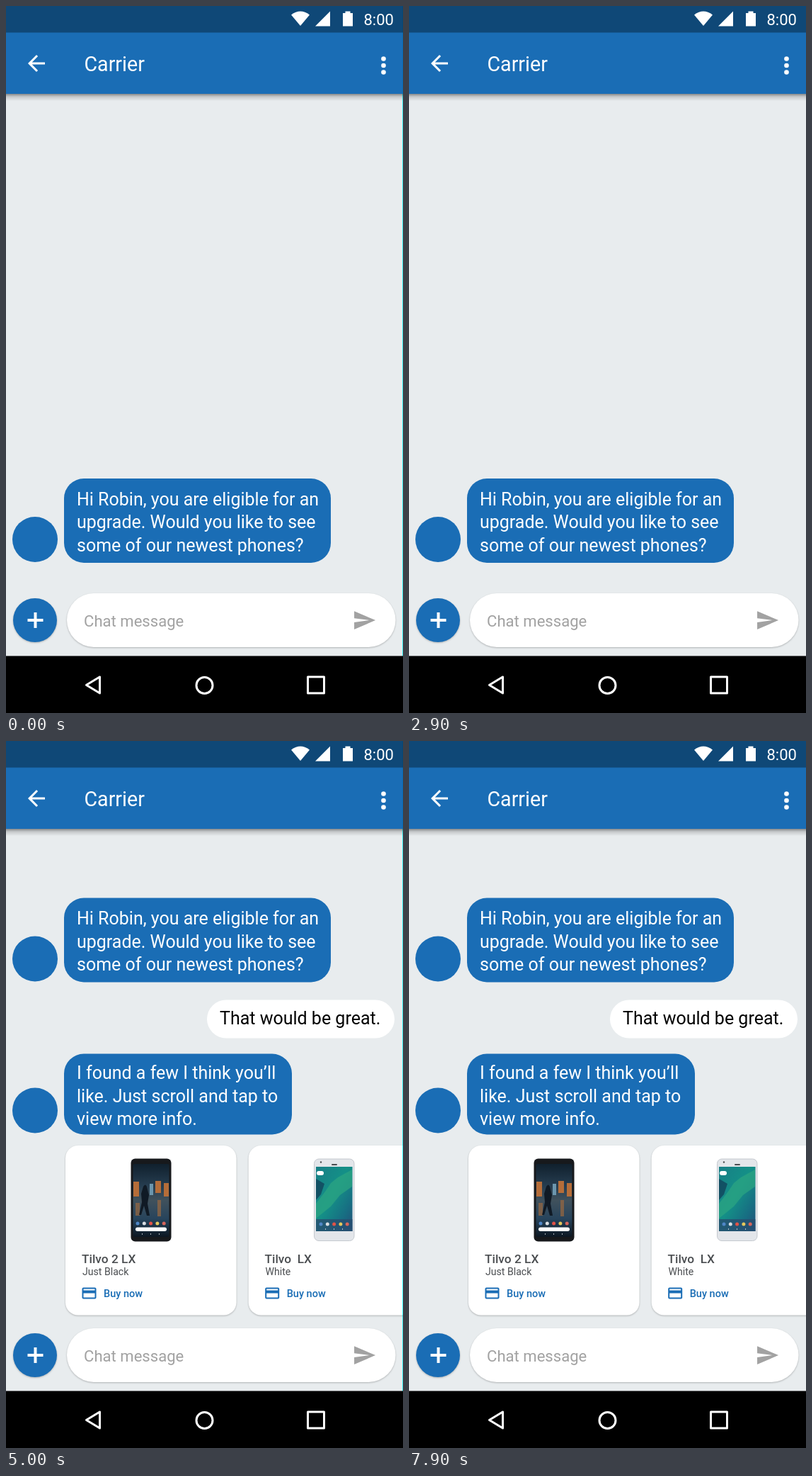
These frames come from a looping animation (561x998 px, 8 s). An HTML page:

```html
<!DOCTYPE html>
<html lang="en">
<head>
<meta charset="utf-8">
<title>Chat</title>
<style>
  html, body { margin: 0; width: 100%; height: 100%; overflow: hidden; background: #e8ecee; }
  svg { display: block; width: 100vw; height: 100vh; font-family: Roboto, sans-serif; }
  text { white-space: pre; }
  .blue { fill: #1a6db5; }
  .white { fill: #fff; }
  .speech { font-size: 25px; }
  .name { font-size: 17.3px; font-weight: 500; fill: #4b4e51; }
  .detail { font-size: 14.1px; fill: #4b4e51; }
  .buy { font-size: 14.5px; font-weight: 500; }
  .raised { filter: drop-shadow(0 1.5px 1px rgba(0, 0, 0, .24)); }
  .outline { fill: none; stroke: #fff; stroke-width: 3; stroke-linejoin: round; }

  .thread, .reply, .offer, .fringe { animation: 8s step-end infinite; }
  .thread { animation-name: scroll; }
  .reply { animation-name: reply; }
  .offer { animation-name: offer; }
  .fringe { animation-name: flicker; fill: #40ffff; mix-blend-mode: multiply; }

  @keyframes scroll {
    0% { transform: translateY(445.5px); }
    37.5% { transform: translateY(388px); }
    62.5%, 100% { transform: none; }
  }
  @keyframes reply {
    0% { visibility: hidden; }
    37.5%, 100% { visibility: visible; }
  }
  @keyframes offer {
    0% { visibility: hidden; }
    62.5%, 100% { visibility: visible; }
  }
  @keyframes flicker {
    0%, 6.25%, 11.25%, 37.5%, 42.5%, 68.75%, 73.75% { opacity: 1; }
    5%, 10%, 36.25%, 41.25%, 67.5%, 72.5%, 98.75%, 100% { opacity: 0; }
  }
</style>
</head>
<body>
<svg viewBox="0 0 561 998">
  <defs>
    <linearGradient id="shade" x2="0" y2="1">
      <stop stop-opacity=".42"/>
      <stop offset=".4" stop-opacity=".15"/>
      <stop offset="1" stop-opacity="0"/>
    </linearGradient>
    <linearGradient id="street" x2="0" y2="1">
      <stop stop-color="#10202d"/>
      <stop offset=".3" stop-color="#263d50"/>
      <stop offset=".5" stop-color="#40515c"/>
      <stop offset=".75" stop-color="#27445c"/>
      <stop offset="1" stop-color="#0c1722"/>
    </linearGradient>
    <linearGradient id="coast" x2="1" y2="1">
      <stop stop-color="#177f86"/>
      <stop offset=".45" stop-color="#149087"/>
      <stop offset=".75" stop-color="#176f83"/>
      <stop offset="1" stop-color="#244f78"/>
    </linearGradient>
    <path id="credit" d="M20 4H4c-1.1 0-2 .9-2 2v12c0 1.1.9 2 2 2h16c1.1 0 2-.9 2-2V6c0-1.1-.9-2-2-2zm0 14H4v-6h16zm0-10H4V6h16z"/>
    <g id="dock">
      <circle r="2.5" fill="#4f86c6"/>
      <circle cx="9.3" r="2.5" fill="#d9dde1"/>
      <circle cx="18.6" r="2.5" fill="#e25247"/>
      <circle cx="27.9" r="2.5" fill="#e5c75c"/>
      <circle cx="37.2" r="2.5" fill="#d6655b"/>
    </g>
    <g id="card">
      <rect class="white raised" x="84" y="571" width="241.5" height="239.5" rx="18"/>
      <use href="#credit" class="blue" x="105.5" y="767.5"/>
      <text class="blue buy" x="138" y="784.5">Buy now</text>
    </g>
  </defs>

  <rect width="561" height="998" fill="#e8ecee"/>

  <g class="thread">
    <circle class="blue" cx="41" cy="307.5" r="32"/>
    <rect class="blue" x="82" y="221.5" width="377" height="119" rx="28"/>
    <g class="white speech">
      <text x="100" y="259">Hi Robin, you are eligible for an</text>
      <text x="100" y="291.5">upgrade. Would you like to see</text>
      <text x="100" y="324">some of our newest phones?</text>
    </g>
    <g class="reply">
      <rect class="white" x="284" y="365.5" width="265" height="54" rx="27"/>
      <text class="speech" x="302" y="400">That would be great.</text>
    </g>
  </g>

  <g class="offer">
    <circle class="blue" cx="41" cy="521.5" r="32"/>
    <rect class="blue" x="82" y="441.5" width="322" height="114" rx="28"/>
    <g class="white speech">
      <text x="100" y="477">I found a few I think you’ll</text>
      <text x="100" y="509.5">like. Just scroll and tap to</text>
      <text x="100" y="542">view more info.</text>
    </g>

    <use href="#card"/>
    <rect x="176.5" y="589.5" width="57" height="117" rx="6" fill="#17191c"/>
    <rect x="179.5" y="597" width="51" height="103" rx="2" fill="url(#street)"/>
    <path d="M180 622h8v21h-8zM211 621h8v17h-8zM223 624h7v19h-7z" fill="#b56d39"/>
    <path d="M203 625h5v16h-5z" fill="#6c96ad"/>
    <path d="M183 652h6v18h-6zM214 648h5v23h-5z" fill="#9b6840" opacity=".7"/>
    <path d="M194 629q3-5 5 0l3 12-2 12 3 17h-4l-4-14-4 13h-3l4-18-1-12z" fill="#101a25"/>
    <use href="#dock" x="186" y="681"/>
    <rect class="white" x="183" y="686.5" width="44" height="5.5" rx="2.75"/>
    <path d="M192 696h1m11 0h1m11 0h1" stroke="#d9dde1" stroke-width="1.5"/>
    <text class="name" x="107" y="736.5">Tilvo 2 LX</text>
    <text class="detail" x="108" y="754">Just Black</text>

    <use href="#card" x="258.7"/>
    <rect x="435.5" y="590" width="56.5" height="115.5" rx="6.5" fill="#e3e6ea" stroke="#c5c9cf"/>
    <rect x="438" y="601" width="51.5" height="91" fill="url(#coast)"/>
    <path d="M438 653l13-17 8-12 10-8 20-11v24l-17 12-13 16-21 17z" fill="#2ba482" opacity=".75"/>
    <path d="M438 618l12 7-5 15-7 8z" fill="#123f58" opacity=".75"/>
    <rect x="438" y="675" width="51.5" height="17" fill="#274e70" opacity=".8"/>
    <rect class="white" x="439" y="607" width="10" height="6" rx="3"/>
    <rect x="460" y="597" width="8" height="2" rx="1" fill="#4b4e51"/>
    <circle cx="445" cy="594.5" r="1.2" fill="#4b4e51"/>
    <use href="#dock" x="445" y="682"/>
    <path d="M451 689h1m11 0h1m11 0h1" stroke="#d9dde1" stroke-width="1.5"/>
    <text class="name" x="365.5" y="736.5">Tilvo  LX</text>
    <text class="detail" x="366.5" y="754">White</text>
  </g>

  <rect y="124" width="561" height="10" fill="url(#shade)"/>
  <rect class="blue" y="37" width="561" height="87"/>
  <rect width="561" height="37.5" fill="#0f4877"/>
  <g class="white">
    <path d="M403 12.5Q416 2.500 429 12.500L416 28z"/>
    <path d="M437 28.500L458 7.500v21z"/>
    <path d="M479.500 10V7.500h7V10h3.500v18.500h-14V10z"/>
    <text x="505.5" y="27" font-size="22">8:00</text>
    <path transform="translate(25 63) scale(1.5)" d="M20 11H7.830l5.590-5.590L12 4l-8 8 8 8 1.410-1.410L7.830 13H20z"/>
    <text x="110.500" y="92" font-size="28.600">Carrier</text>
    <circle cx="533.5" cy="74.500" r="3.300"/>
    <circle cx="533.5" cy="84" r="3.300"/>
    <circle cx="533.5" cy="93.500" r="3.300"/>
  </g>

  <circle class="blue raised" cx="41" cy="867" r="31"/>
  <path d="M30.500 867h22m-11-11v22" stroke="#fff" stroke-width="4"/>
  <rect class="white raised" x="86" y="829" width="464.500" height="76" rx="38"/>
  <text x="110" y="875.500" font-size="22.100" fill="#a2a2a2">Chat message</text>
  <path transform="translate(489.200 849.900) scale(1.430)" d="M2 21l21-9L2 3v7l15 2-15 2z" fill="#a2a2a2"/>

  <rect y="917.500" width="561" height="81"/>
  <g class="outline">
    <path d="M113.500 958.500L132.500 947v23z"/>
    <circle cx="280.500" cy="959" r="11.500"/>
    <rect x="426.500" y="947" width="23" height="23"/>
  </g>

  <rect class="fringe" x="560" width="1" height="998"/>
</svg>
</body>
</html>
```
